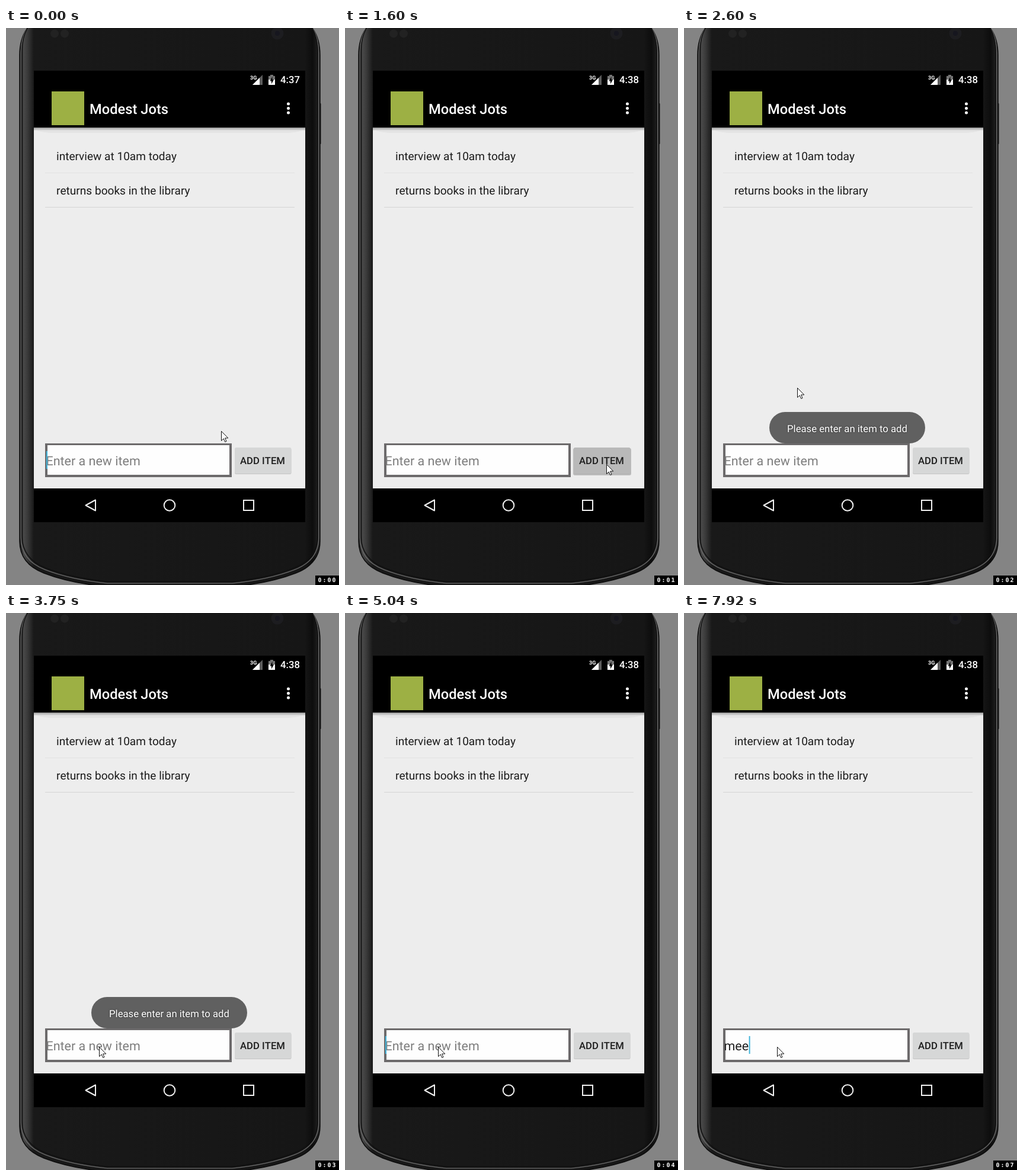
Write an HTML page that moves like this. It is 562 by 940 pixels and loops after 8000 ms.

```html
<!DOCTYPE html>
<html lang="en">
<head>
<meta charset="utf-8">
<title>Todo list on a phone</title>
<style>
  html, body { margin: 0; width: 100%; height: 100%; overflow: hidden; background: #848484; }
  svg { display: block; width: 562px; height: 940px; }
  text { font-family: Roboto, sans-serif; font-kerning: none; text-rendering: geometricPrecision; white-space: pre; }
  .medium { font-weight: 500; }
  .item { font-size: 19.08px; fill: #1c1c1c; }
  .field { font-size: 21.47px; }
  #toast text { font-size: 16.7px; fill: #fff; text-shadow: 0 0 3px rgba(0, 0, 0, .5); }
  #timer { font: bold 10px "DejaVu Sans Mono", monospace; fill: #fff; }
</style>
</head>
<body>
<svg viewBox="0 0 562 940">
  <defs>
    <linearGradient id="bezel" gradientUnits="userSpaceOnUse" x1="23" x2="530" y1="0" y2="0">
      <stop offset="0" stop-color="#161616"/>
      <stop offset=".014" stop-color="#484848"/>
      <stop offset=".026" stop-color="#3a3a3a"/>
      <stop offset=".047" stop-color="#191919"/>
      <stop offset=".95" stop-color="#161616"/>
      <stop offset=".975" stop-color="#0d0d0d"/>
      <stop offset="1" stop-color="#252525"/>
    </linearGradient>
    <linearGradient id="barShadow" x2="0" y2="1">
      <stop offset="0" stop-color="#9c9c9c"/>
      <stop offset="1" stop-color="#e2e2e2"/>
    </linearGradient>
    <path id="shell" d="M39-4C29 8 23 23 23 46V866C23 893 38 910 64 920C95 932 130 939 170 943H383C423 939 458 932 489 920C515 910 530 893 530 866V46C530 23 524 8 514-4Z"/>
  </defs>

  <rect width="562" height="940" fill="#848484"/>
  <rect x="528" y="127" width="3.5" height="69" rx="1" fill="#151515"/>
  <use href="#shell" fill="url(#bezel)" stroke="#0c0c0c" stroke-width="1.5"/>
  <use href="#shell" fill="none" stroke="#6a6a6a" stroke-width="1.4" transform="translate(2.5 -4) scale(.991 .998)"/>
  <use href="#shell" fill="none" stroke="#101010" stroke-width="1.5" transform="translate(4.4 -6) scale(.984 .997)"/>
  <g fill="#222">
    <circle cx="82" cy="9.5" r="7"/><circle cx="99" cy="9.5" r="7"/>
    <circle cx="458" cy="9" r="10.5" fill="#1d1d20"/>
    <circle cx="458" cy="9" r="4" fill="#16161f"/>
  </g>

  <rect x="47" y="72" width="458" height="762"/>
  <rect x="47" y="168" width="458" height="609" fill="#ededed"/>
  <path d="M47 168H505V172C494 175 484 177 470 177H82C68 177 58 175 47 172Z" fill="#e4e4e4"/>
  <rect x="47" y="168" width="458" height="5" fill="url(#barShadow)"/>

  <g fill="#fff">
    <text x="412" y="87" font-size="9" font-weight="700">3G</text>
    <path d="M433 79V96H416Z" fill="#5c5c5c"/>
    <path d="M428 84V96H416Z"/>
    <path d="M446 79H451V81H454V96H443V81H446Z"/>
    <path d="M443 81H446V79H451V81H454V87H443Z" fill="#737373"/>
    <path d="M449.5 82L445.5 89.5H448V94.5L452 87H449.5Z" fill="#000"/>
    <text id="phoneTime" class="medium" x="463" y="93" font-size="16.7"></text>
    <text class="medium" x="141" y="145" font-size="23.7">Modest Jots</text>
    <circle cx="476.5" cy="128" r="2.5"/><circle cx="476.5" cy="135.5" r="2.5"/><circle cx="476.5" cy="143" r="2.5"/>
  </g>
  <rect x="77" y="107" width="55" height="57" fill="#9db044"/>

  <text class="item" x="85" y="223">interview at 10am today</text>
  <text class="item" x="85" y="281">returns books in the library</text>
  <path d="M66 244.5H487" stroke="#e1e1e1"/>
  <path d="M66 302.5H487" stroke="#d5d5d5"/>

  <rect x="66" y="701" width="315" height="57" fill="#6c6a6b"/>
  <rect x="70" y="704" width="307" height="50" fill="#fefefe"/>
  <text id="hint" class="field" x="67.5" y="738" fill="#7d7d7d">Enter a new item</text>
  <text id="typed" class="field" x="67.5" y="738" fill="#202020"></text>
  <rect id="caret" y="714" width="2" height="30" fill="#42b4da"/>

  <rect x="386" y="709.5" width="95.5" height="43.5" rx="2.5" fill="#c4c4c4"/>
  <rect x="386" y="708" width="95.5" height="44" rx="2.5" fill="#d6d7d7"/>
  <g id="press">
    <rect x="385" y="709" width="98" height="46" rx="3" fill="#a9a9a9" opacity=".7"/>
    <rect x="386" y="708" width="95.5" height="44" rx="2.5" fill="#b9b9b9"/>
  </g>
  <text class="medium" x="433" y="736" font-size="16.7" text-anchor="middle" fill="#1d1d1d">ADD ITEM</text>

  <g fill="none" stroke="#f0f0f0" stroke-width="2">
    <path d="M151 796.5V814.5L134.5 805.5Z" stroke-linejoin="round"/>
    <circle cx="276" cy="805.5" r="9.3"/>
    <rect x="401" y="797" width="17" height="17"/>
  </g>

  <g id="toast">
    <rect x="144" y="648" width="263" height="53" rx="26.5" fill="#606060"/>
    <text x="275.5" y="681.5" text-anchor="middle">Please enter an item to add</text>
  </g>

  <g id="ring" fill="none">
    <circle cx="158.5" cy="734" r="9.5" stroke="#fff" stroke-width="3"/>
    <circle cx="158.5" cy="734" r="10" stroke="#222"/>
  </g>
  <path id="pointer" d="M.5.5V16.5L4.2 13L6.7 18.5L9 17.5L6.6 12H11.8Z" fill="#fff" stroke="#111" stroke-linejoin="round"/>

  <rect x="522" y="924" width="40" height="16"/>
  <text id="timer" x="526.5 534.5 542.5 550.5" y="935"></text>
</svg>
<script>
const LOOP = 8000, STEP = 130, BLINK = 535, SECOND = 1020;
const PRESS = 1600, TYPING = 7340, KEY = 190;
const el = Object.fromEntries([...document.querySelectorAll('svg [id]')].map(n => [n.id, n]));

const pointerStart = { x: 363, y: 680 };
const pointerMoves = [
  { from: 0, to: 520, x: 263, y: 733 },
  { from: 700, to: 1450, x: 441, y: 736 },
  { from: 1980, to: 2600, x: 191, y: 607 },
  { from: 2600, to: 3100, x: 360, y: 659 },
  { from: 3100, to: 3630, x: 157, y: 732 }
];

const ramp = (t, from, to) => Math.min(1, Math.max(0, (t - from) / (to - from)));
const easeOut = u => Math.sin(u * Math.PI / 2);
const show = (node, visible) => node.style.visibility = visible ? 'visible' : 'hidden';

function pointerAt(t) {
  return pointerMoves.reduce((p, move) => {
    const u = easeOut(ramp(t, move.from, move.to));
    return { x: p.x + (move.x - p.x) * u, y: p.y + (move.y - p.y) * u };
  }, pointerStart);
}

function draw(t) {
  const sampled = Math.floor(t / STEP) * STEP;
  const input = 'mee'.slice(0, Math.max(0, Math.floor((t - TYPING) / KEY)));
  const blinkOn = Math.floor((t - STEP) / BLINK) % 2 !== 0;

  el.typed.textContent = input;
  el.phoneTime.textContent = t < STEP ? '4:37' : '4:38';
  el.timer.textContent = '0:0' + Math.floor(t / SECOND);
  show(el.hint, !input);
  show(el.caret, input || blinkOn);
  el.caret.setAttribute('x', 68 + (input && el.typed.getComputedTextLength()));

  el.press.setAttribute('opacity', t < PRESS ? 0 : 1 - ramp(t, PRESS, PRESS + 450) ** 2);
  el.toast.setAttribute('opacity', ramp(sampled, 1690, 1900) - ramp(sampled, 4030, 4320));
  show(el.ring, sampled === 32 * STEP);

  const { x, y } = pointerAt(sampled);
  el.pointer.setAttribute('transform', `translate(${Math.round(x)} ${Math.round(y)})`);
}

const begin = performance.now();
function tick() {
  draw((performance.now() - begin) % LOOP);
  requestAnimationFrame(tick);
}
tick();
</script>
</body>
</html>
```
